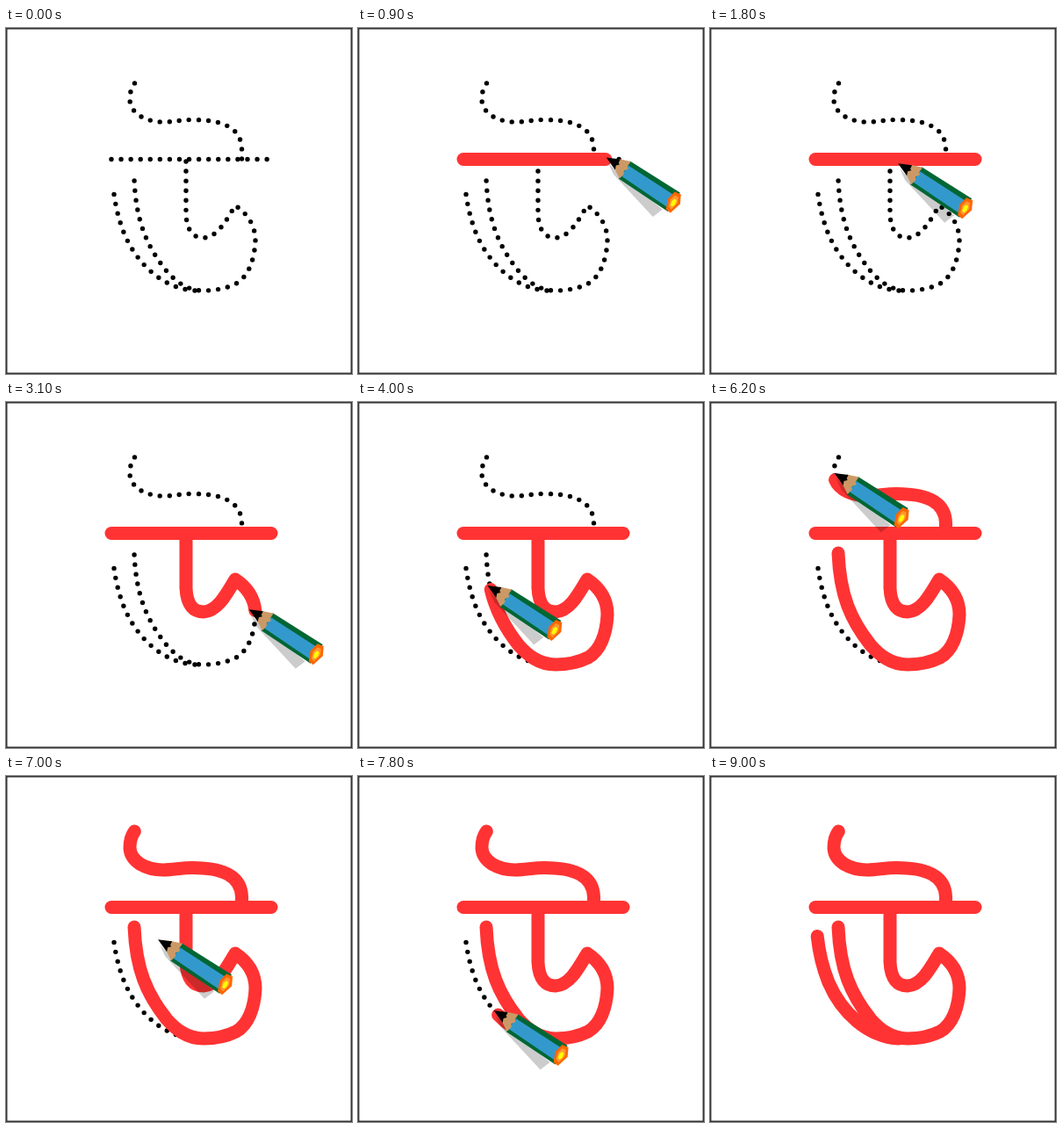
Write an HTML page that moves like this. It is 394x394 px and loops after 9.1 s.

```html
<!DOCTYPE html>
<html lang="bn">
<head>
<meta charset="utf-8">
<title>Letter tracing</title>
<style>
html, body { margin: 0; width: 100%; height: 100%; overflow: hidden; background: #fff; }
svg { display: block; width: 100vw; height: 100vh; }
.dots, .ink { fill: none; stroke-linecap: round; stroke-linejoin: round; }
.dots { stroke: #000; stroke-width: 5.4; stroke-dasharray: 0 11.07; }
.ink { stroke: #f33; stroke-width: 15; }
</style>
</head>
<body>
<svg viewBox="0 0 394 394">
  <g id="guide"></g>
  <g id="drawn"></g>
  <g id="pencil">
    <path d="M2 6L8 19L53 67.5L64 59L16 20Z" opacity=".2"/>
    <path d="M27 4L84 40L70 61.5L14 24Z" fill="#063"/>
    <path d="M25 9L79 44L70 57L17 21Z" fill="#39c"/>
    <path d="M14 1.5L28 4.5L24 10L25 13L20 15L20 19L15 24L9 12Z" fill="#c96"/>
    <path d="M0 0L16 2L14 6L15 8L11 9L10 14Z"/>
    <path d="M78 39L85 42L84 53L73 63L68 59L70 47Z" fill="#f60"/>
    <path d="M78 43L82 45L81 52L74 59L71 56L73 48Z" fill="#f93"/>
    <path d="M78 47L80 49L78 54L75 56L73 54L75 49Z" fill="#ff0"/>
  </g>
  <rect x=".75" y=".75" width="392.5" height="392.5" fill="none" stroke="#333" stroke-width="1.5"/>
</svg>
<script>
const LOOP = 9100, STEP = 100, FADE = 8300, GONE = 9000;

// keys: time, drawn length, pencil tip offset x and y
const strokes = [
  { d: 'M120 149.5H302',
    keys: [[100, 0, 1, -2], [1000, 182, 1, -2]] },
  { d: 'M205 152V212C206 232 214 239 225 239C241 238 251 219 261 202C276 212 284 226 284 242' +
       'C283 264 276 283 262 291C250 297 237 299 225 299C205 299 192 287 183 277C160 248 148 220 146 172',
    keys: [[1900, 0, -2, 3], [3100, 195, -7, -1], [4000, 414, -4, -5], [4200, 456, -3, -4]] },
  { d: 'M268.5 149V138C268 113 246 104.5 212 104.5C200 104.5 190 107 179 107' +
       'C160 107 142 98 141 82C141 73 143 66 149 60',
    keys: [[5400, 0, 0, 0], [6000, 124, 5, -4], [6200, 161, -1, -8], [6340, 188, -1, -5]] },
  { d: 'M215 299C180 297 150 270 135 235C128 218 124 200 122 181',
    keys: [[7570, 14, -4, 0], [7800, 63, -5, -5], [8000, 105, -4, -5], [8250, 162, -4, -5]] }
];

const byId = id => document.getElementById(id);
const pencil = byId('pencil');

function addPath(parent, name, d) {
  const path = document.createElementNS('http://www.w3.org/2000/svg', 'path');
  path.setAttribute('class', name);
  path.setAttribute('d', d);
  return byId(parent).appendChild(path);
}

// Interpolates rows of [time, ...values], holding both ends.
function sample(keys, t) {
  const i = keys.findIndex(k => k[0] > t);
  if (i < 0) return keys[keys.length - 1].slice(1);
  if (i === 0) return keys[0].slice(1);
  const a = keys[i - 1], b = keys[i];
  const p = (t - a[0]) / (b[0] - a[0]);
  return a.slice(1).map((v, n) => v + (b[n + 1] - v) * p);
}

function tipOn(stroke, t) {
  const [length, dx, dy] = sample(stroke.keys, t);
  const point = stroke.ink.getPointAtLength(length);
  return [point.x + dx, point.y + dy];
}

for (const s of strokes) {
  addPath('guide', 'dots', s.d);
  s.ink = addPath('drawn', 'ink', s.d);
  s.start = s.keys[0][0];
  s.end = s.keys[s.keys.length - 1][0];
}

// The pencil glides straight from the end of one stroke to the next.
const glide = strokes.flatMap(s => [s.start, s.end].map(t => [t, ...tipOn(s, t)]));

function draw(t) {
  for (const s of strokes) {
    s.ink.style.display = t < s.start ? 'none' : '';
    s.ink.style.strokeDasharray = `${sample(s.keys, t)[0]} 999`;
  }
  const active = strokes.find(s => t >= s.start && t <= s.end);
  const [x, y] = active ? tipOn(active, t) : sample(glide, t);
  pencil.setAttribute('transform', `translate(${x} ${y})`);
  pencil.style.opacity = t < STEP ? 0 : Math.min(1, Math.max(0, (GONE - t) / (GONE - FADE)));
}

const begin = performance.now();
function frame() {
  const t = (performance.now() - begin) % LOOP;
  draw(Math.floor(t / STEP) * STEP);
  requestAnimationFrame(frame);
}
frame();
</script>
</body>
</html>
```
